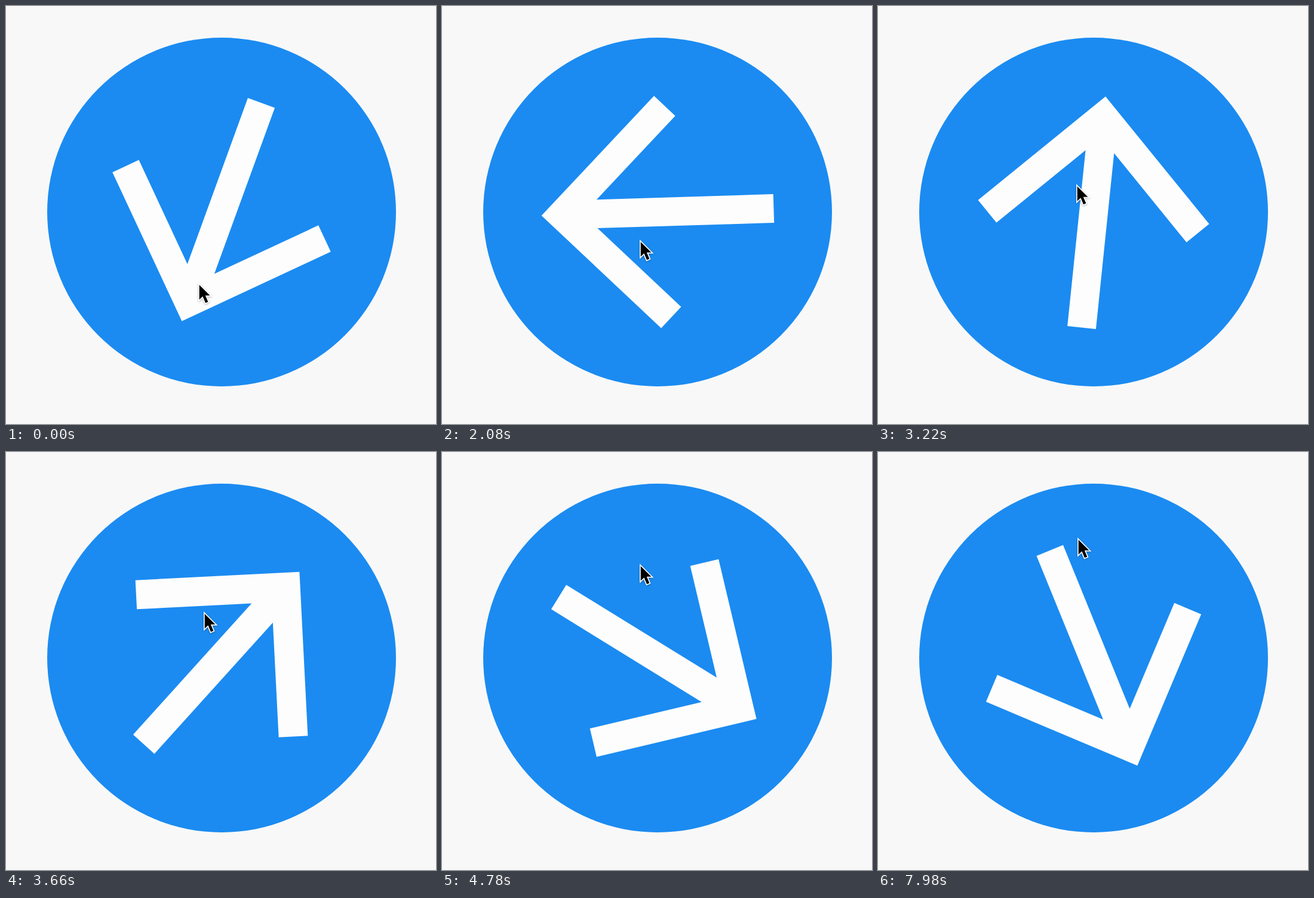
These frames come from a looping animation (720x700 px, 8 s). An HTML page:

```html
<!DOCTYPE html>
<html lang="en">
<head>
<meta charset="utf-8">
<title>Rotary knob</title>
<style>
  html, body { margin: 0; width: 100%; height: 100%; overflow: hidden; background: #f8f8f8; }
  svg { display: block; }
  .pointer { filter: drop-shadow(0 1.5px 1.5px rgba(0, 0, 0, .3)); }
</style>
</head>
<body>
<svg width="720" height="700" viewBox="0 0 720 700">
  <rect width="720" height="700" fill="#f8f8f8"/>
  <circle cx="361" cy="345" r="292" fill="#1b8bf1"/>
  <path id="arrow" fill="#fdfdfd"
    d="M0-194.5 194.5 0 160 34.5 24-101.5V194.5H-24V-101.5L-160 34.5-194.5 0Z"/>
  <g id="pointer" class="pointer">
    <path transform="scale(1.1)" d="M1.5 3.6V26.2L6.7 21.2 10.9 31.2 14.9 29.5 10.7 19.8H17.7Z"
      fill="#000" stroke="#fff" stroke-width="3" paint-order="stroke"/>
  </g>
</svg>
<script>
const LOOP = 8000, BEAT = 840, STEP = 43.5, RETURN = 7540;
const TOP = 142, BOTTOM = 464;
const arrow = document.getElementById('arrow');
const pointer = document.getElementById('pointer');

// Drag from end stop to end stop: time, knob angle, pointer height
const drag = [
  [533, -160, BOTTOM], [1211, -144.2, 443], [2051, -91.8, 392],
  [3196, 5.9, 299], [4180, 80.9, 233], [5600, 160, TOP]
];

// Smooth curve through one column of the drag, at rest at both ends
function along(col, t) {
  const last = drag.length - 1;
  if (t <= drag[0][0]) return drag[0][col];
  if (t >= drag[last][0]) return drag[last][col];
  const i = drag.findIndex(p => p[0] > t) - 1;
  const speed = k => k === 0 || k === last ? 0
    : (drag[k + 1][col] - drag[k - 1][col]) / (drag[k + 1][0] - drag[k - 1][0]);
  const a = drag[i], b = drag[i + 1], h = b[0] - a[0];
  const u = (t - a[0]) / h, w = 1 - u;
  return a[col] * (1 + 2 * u) * w * w + b[col] * u * u * (3 - 2 * u)
    + h * u * w * (speed(i) * w - speed(i + 1) * u);
}

// The picture advances 18 times per beat, then rests briefly
function stepped(t) {
  const p = (t + 20) % BEAT;
  return t - p + Math.min(17, Math.floor(p / STEP)) * STEP;
}

function draw(ms) {
  const t = stepped(ms % LOOP);
  const back = 2 * (Math.max(0, t - RETURN) / (10 * STEP)) ** 2;
  const angle = along(1, t) - back * 1.07;
  const y = along(2, t) + back;
  // The hand sways a little sideways on its way up
  const s = (BOTTOM - y) / (BOTTOM - TOP);
  const x = 322 + 12 * s + 4 * (Math.sin(Math.PI * s) + Math.sin(2 * Math.PI * s));
  arrow.setAttribute('transform', `translate(361 345) rotate(${angle})`);
  pointer.setAttribute('transform', `translate(${Math.round(x)} ${Math.round(y) - 1})`);
}

const start = performance.now();
function tick() {
  draw(performance.now() - start);
  requestAnimationFrame(tick);
}
tick();
</script>
</body>
</html>
```
